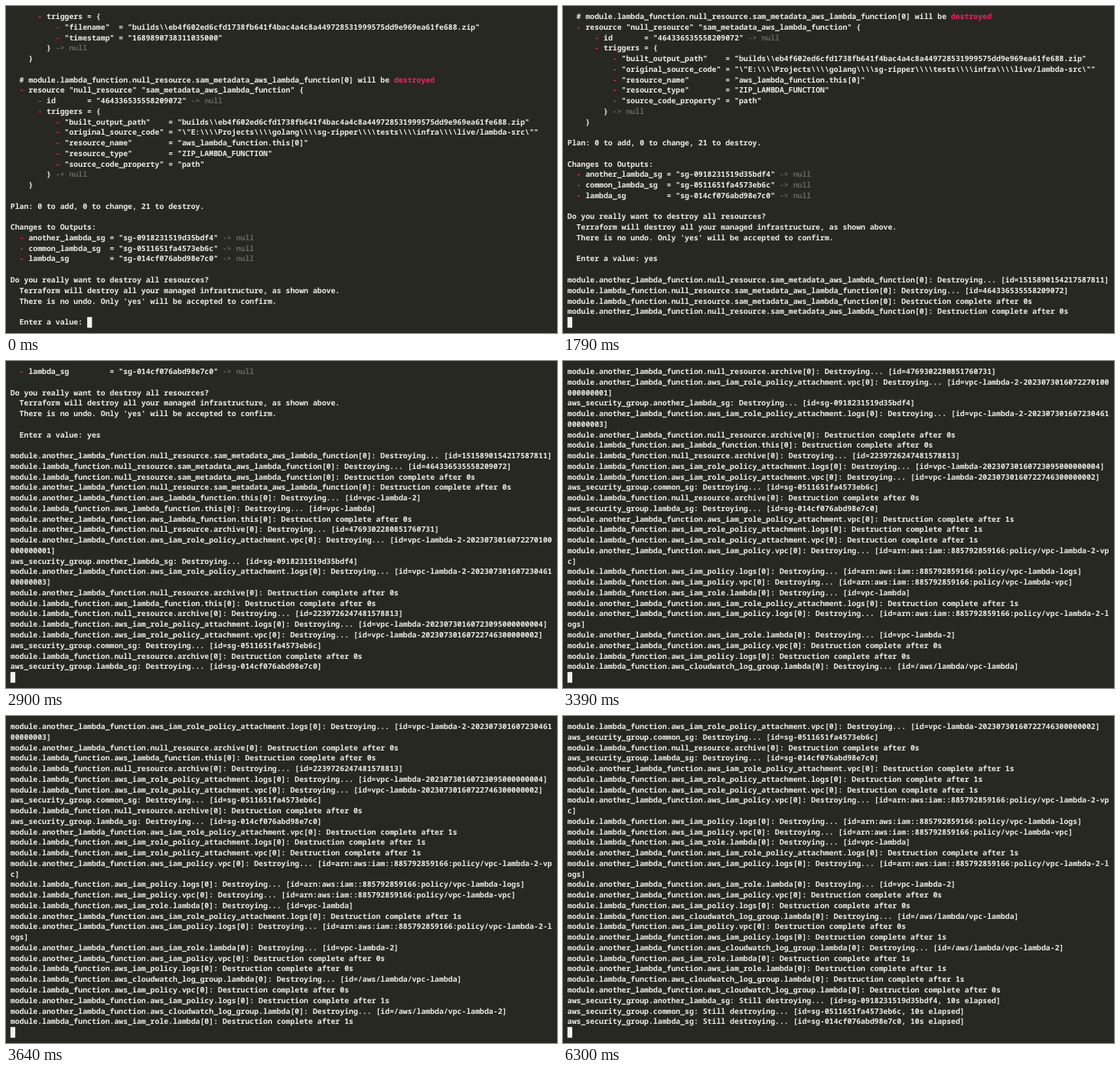
An HTML page for the animation above (8000 ms loop, 720x427 px).

```html
<!DOCTYPE html>
<html lang="en">
<head>
<meta charset="utf-8">
<title>Terminal</title>
<style>
  html, body { margin: 0; width: 100%; height: 100%; overflow: hidden; background: #272822; }
  svg { display: block; width: 100%; height: 100%; }
  text {
    font: 600 9.833px "Noto Sans Mono", "DejaVu Sans Mono", monospace;
    font-variant-ligatures: none;
    text-rendering: geometricPrecision;
    white-space: pre;
    fill: #ecece4;
  }
  .red { fill: #ee246b; }
  .dim { fill: #66665e; }
</style>
</head>
<body>
<svg viewBox="0 0 720 427"><g id="rows"></g><rect id="cursor" width="6.3" height="14" fill="#f4f4ee"/></svg>
<script>
const LOOP = 8000, ROWS = 30, COLS = 120;
const LEFT = 5.8, CHAR = 5.9, LINE = 13.76, BASE = 17;
const NS = 'http://www.w3.org/2000/svg';

const plan = String.raw`      - triggers = {
          - "filename"  = "builds\\eb4f602ed6cfd1738fb641f4bac4a4c8a449728531999575dd9e969ea61fe688.zip"
          - "timestamp" = "1689890738311035000"
        } -> null
    }

  # module.lambda_function.null_resource.sam_metadata_aws_lambda_function[0] will be destroyed
  - resource "null_resource" "sam_metadata_aws_lambda_function" {
      - id       = "464336535558209072" -> null
      - triggers = {
          - "built_output_path"    = "builds\\eb4f602ed6cfd1738fb641f4bac4a4c8a449728531999575dd9e969ea61fe688.zip"
          - "original_source_code" = "\"E:\\\\Projects\\\\golang\\\\sg-ripper\\\\tests\\\\infra\\\\live/lambda-src\""
          - "resource_name"        = "aws_lambda_function.this[0]"
          - "resource_type"        = "ZIP_LAMBDA_FUNCTION"
          - "source_code_property" = "path"
        } -> null
    }

Plan: 0 to add, 0 to change, 21 to destroy.

Changes to Outputs:
  - another_lambda_sg = "sg-0918231519d35bdf4" -> null
  - common_lambda_sg  = "sg-0511651fa4573eb6c" -> null
  - lambda_sg         = "sg-014cf076abd98e7c0" -> null

Do you really want to destroy all resources?
  Terraform will destroy all your managed infrastructure, as shown above.
  There is no undo. Only 'yes' will be accepted to confirm.
`.split('\n');
const prompt = '  Enter a value: ';

// Resource addresses
const one = 'module.lambda_function.', two = 'module.another_lambda_function.';
const group = 'aws_security_group.';
const meta = 'null_resource.sam_metadata_aws_lambda_function[0]';
const archive = 'null_resource.archive[0]';
const fn = 'aws_lambda_function.this[0]';
const role = 'aws_iam_role.lambda[0]';
const logGroup = 'aws_cloudwatch_log_group.lambda[0]';
const attach = kind => `aws_iam_role_policy_attachment.${kind}[0]`;
const policy = kind => `aws_iam_policy.${kind}[0]`;
const arn = name => 'arn:aws:iam::885792859166:policy/vpc-lambda-' + name;

const start = (name, id) => `${name}: Destroying... [id=${id}]`;
const done = (name, sec) => `${name}: Destruction complete after ${sec}s`;
const still = (name, id) => `${group}${name}: Still destroying... [id=${id}, 10s elapsed]`;

const typing = [[1370, 'y'], [1460, 'ye'], [1550, 'yes']];
const ENTER = 1700;

const output = [
  [ENTER, '',
    start(two + meta, '1515890154217587811'),
    start(one + meta, '464336535558209072')],
  [1790, done(one + meta, 0), done(two + meta, 0)],
  [2550,
    start(two + fn, 'vpc-lambda-2'),
    start(one + fn, 'vpc-lambda'),
    done(two + fn, 0),
    start(two + archive, '4769302280851760731'),
    start(two + attach('vpc'), 'vpc-lambda-2-2023073016072270100000000001'),
    start(group + 'another_lambda_sg', 'sg-0918231519d35bdf4'),
    start(two + attach('logs'), 'vpc-lambda-2-20230730160723046100000003'),
    done(two + archive, 0)],
  [2900,
    done(one + fn, 0),
    start(one + archive, '2239726247481578813'),
    start(one + attach('logs'), 'vpc-lambda-20230730160723095000000004'),
    start(one + attach('vpc'), 'vpc-lambda-20230730160722746300000002'),
    start(group + 'common_sg', 'sg-0511651fa4573eb6c'),
    done(one + archive, 0),
    start(group + 'lambda_sg', 'sg-014cf076abd98e7c0')],
  [3180,
    done(two + attach('vpc'), 1),
    done(one + attach('logs'), 1),
    done(one + attach('vpc'), 1),
    start(two + policy('vpc'), arn('2-vpc')),
    start(one + policy('logs'), arn('logs')),
    start(one + policy('vpc'), arn('vpc')),
    start(one + role, 'vpc-lambda'),
    done(two + attach('logs'), 1),
    start(two + policy('logs'), arn('2-logs')),
    start(two + role, 'vpc-lambda-2')],
  [3390,
    done(two + policy('vpc'), 0),
    done(one + policy('logs'), 0),
    start(one + logGroup, '/aws/lambda/vpc-lambda')],
  [3450, done(one + policy('vpc'), 0)],
  [3510,
    done(two + policy('logs'), 1),
    start(two + logGroup, '/aws/lambda/vpc-lambda-2')],
  [3590, done(one + role, 1)],
  [3660, done(two + role, 1)],
  [3730, done(one + logGroup, 1)],
  [3800, done(two + logGroup, 0)],
  [6300,
    still('another_lambda_sg', 'sg-0918231519d35bdf4'),
    still('common_sg', 'sg-0511651fa4573eb6c'),
    still('lambda_sg', 'sg-014cf076abd98e7c0')]
];

function make(tag, attrs, parent) {
  const el = document.createElementNS(NS, tag);
  for (const key in attrs) el.setAttribute(key, attrs[key]);
  return parent.appendChild(el);
}

const rowBox = document.getElementById('rows');
const cursor = document.getElementById('cursor');
const rows = Array.from({ length: ROWS }, (_, i) =>
  make('text', { x: LEFT, y: BASE + i * LINE }, rowBox));

const wrap = line => line.match(new RegExp(`.{1,${COLS}}`, 'g')) || [''];

function screenAt(t) {
  const typed = typing.filter(([at]) => at <= t).pop();
  const lines = [...plan, prompt + (typed ? typed[1] : '')];
  if (t >= ENTER) {
    for (const [at, ...added] of output) if (at <= t) lines.push(...added.flatMap(wrap));
    lines.push('');
  }
  return lines.slice(-ROWS);
}

function paint(row, line) {
  if (row.shown === line) return;
  row.shown = line;
  row.textContent = '';
  for (const part of line.split(/(^ +- |-> null$|destroyed$)/)) {
    if (!part) continue;
    const color = part === '-> null' ? 'dim' : /^ +- $|^destroyed$/.test(part) ? 'red' : '';
    make('tspan', { class: color }, row).textContent = part;
  }
}

function draw(t) {
  const lines = screenAt(t);
  rows.forEach((row, i) => paint(row, lines[i] || ''));
  const last = lines.length - 1;
  cursor.setAttribute('x', LEFT + lines[last].length * CHAR);
  cursor.setAttribute('y', 7.1 + last * LINE);
}

const begin = performance.now();
function tick() {
  draw((performance.now() - begin) % LOOP);
  requestAnimationFrame(tick);
}
tick();
</script>
</body>
</html>
```
